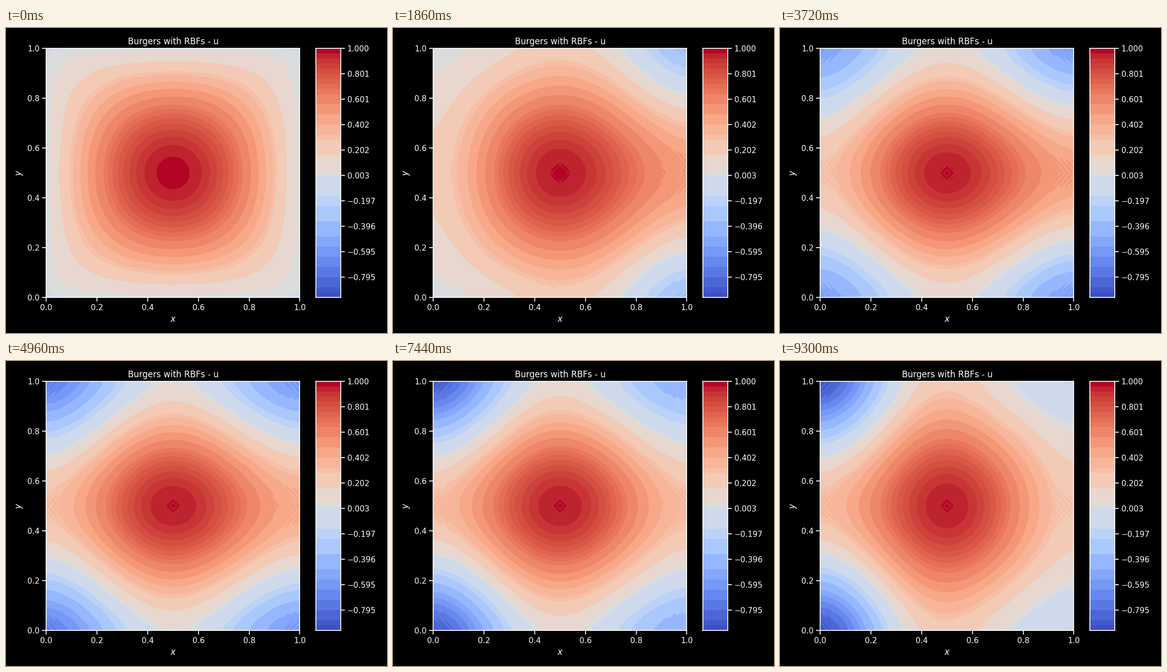
These frames come from a looping animation (750x600 px, 9.92 s). A matplotlib script:

```python
import numpy as np
import matplotlib
import matplotlib.pyplot as plt
from matplotlib.animation import FuncAnimation

W, H = 750, 600
FRAMES, INTERVAL = 16, 620

plt.style.use("dark_background")
plt.rcParams.update({
    "font.family": "DejaVu Sans",
    "axes.linewidth": 1.25, "axes.titlesize": 12, "axes.labelsize": 12,
    "xtick.labelsize": 11, "ytick.labelsize": 11,
    "xtick.major.size": 6, "ytick.major.size": 6,
    "xtick.major.width": 1.25, "ytick.major.width": 1.25,
})

# Colour bands: edges counted in steps down from 1.0
STEP = 0.039886
EDGES = np.array([*range(10), *range(11, 18, 2), 18, 21, 24, 25, 29, 31, 34, 37,
                  *range(39, 48, 2), 48, 49])[::-1]
LEVELS = 1 - STEP * EDGES
COLORS = matplotlib.colormaps["coolwarm"](1 - (EDGES[:-1] + EDGES[1:]) / 98)
COLORS[-1] = matplotlib.colormaps["coolwarm"](1.0)

x, y = np.meshgrid(np.linspace(0, 1, 301), np.linspace(0, 1, 301))
off = np.abs(y - 0.5)
rightness = x * x * (3 - 2 * x)


def ease(t, tau):
    return 1 - np.exp(-max(t, 0) / tau)


def blend(left, right):
    return left + (right - left) * rightness


def hump(z, power):
    return np.abs(np.sin(np.pi * z)) ** power


def fringe(cx, cd, spread, fx, fd, amp):
    """Fine ripples around x = cx, at distance cd from mid height."""
    dx, dd = np.abs(x - cx), np.abs(off - cd)
    wave = np.sin(2 * np.pi * (fx * dx + fd * dd))
    return amp * wave * np.exp(-(dx ** 2 + dd ** 2) / spread ** 2)


def field(t):
    """Central hump over drifting values at the corners, sides and top/bottom."""
    fast = ease(t, 1.2)
    corner = blend(-0.95 * ease(t - 3, 3.5), -0.6 * (1 - (t / 8 - 1) ** 2))
    side = blend(0.32 * ease(t, 3), (0.62 - 0.025 * t) * fast)
    cap = (0.03 + 0.006 * (t - 9) ** 2) * fast
    peak = 0.98 - 0.02 * ease(t, 2)

    sx = hump(x, 1 + 0.75 * ease(t, 2))
    sy = hump(y, 1 + 0.45 * ease(t, 2))
    u = ((1 - sy) * (corner * (1 - sx) + cap * sx)
         + sy * (side * (1 - sx) + peak * sx))

    for cx in (0, 1):
        u += fringe(cx, 0.5, 0.06, 45, 40, 0.05 * fast)
        u += fringe(cx, 0, 0.07, 50, -42, (0.04 + 0.03 * cx) * fast)
    u += fringe(0.4 + 0.015 * t, 0.5, 0.07, 25, 55,
                0.06 * (t / 9 - 1) ** 2 * fast)
    u += fringe(0.5, 0, 0.05, 55, 55, 0.006 * fast)
    return np.clip(u, LEVELS[0] + 1e-3, 0.999)


def pixel_axes(left, top, right, bottom):
    return fig.add_axes([left / W, 1 - bottom / H,
                         (right - left) / W, (bottom - top) / H])


fig = plt.figure(figsize=(W / 100, H / 100), dpi=100, facecolor="black")
ax = pixel_axes(79.4, 40, 578.4, 530)
ax.set(xlim=(0, 1), ylim=(0, 1), xlabel="$x$", ylabel="$y$")
ax.set_title("Burgers with RBFs - u")

bar = pixel_axes(609.6, 40, 658.6, 530)
for low, high, color in zip(LEVELS[:-1], LEVELS[1:], COLORS):
    bar.axhspan(low, high, color=color, lw=0, antialiased=False)
bar.set(xlim=(0, 1), ylim=(LEVELS[0], 1), xticks=[])
ticks = 1 - 5 * STEP * np.arange(10)
bar.set_yticks(ticks, [f"{t:.3f}".replace("-", "\u2212") for t in ticks])
bar.yaxis.tick_right()

contours = []


def draw(i):
    while contours:
        contours.pop().remove()
    contours.append(ax.contourf(x, y, field(i), levels=LEVELS, colors=COLORS))
    return contours


anim = FuncAnimation(fig, draw, frames=FRAMES, interval=INTERVAL,
                     init_func=lambda: draw(0), repeat=True, repeat_delay=0)
plt.show()
```
